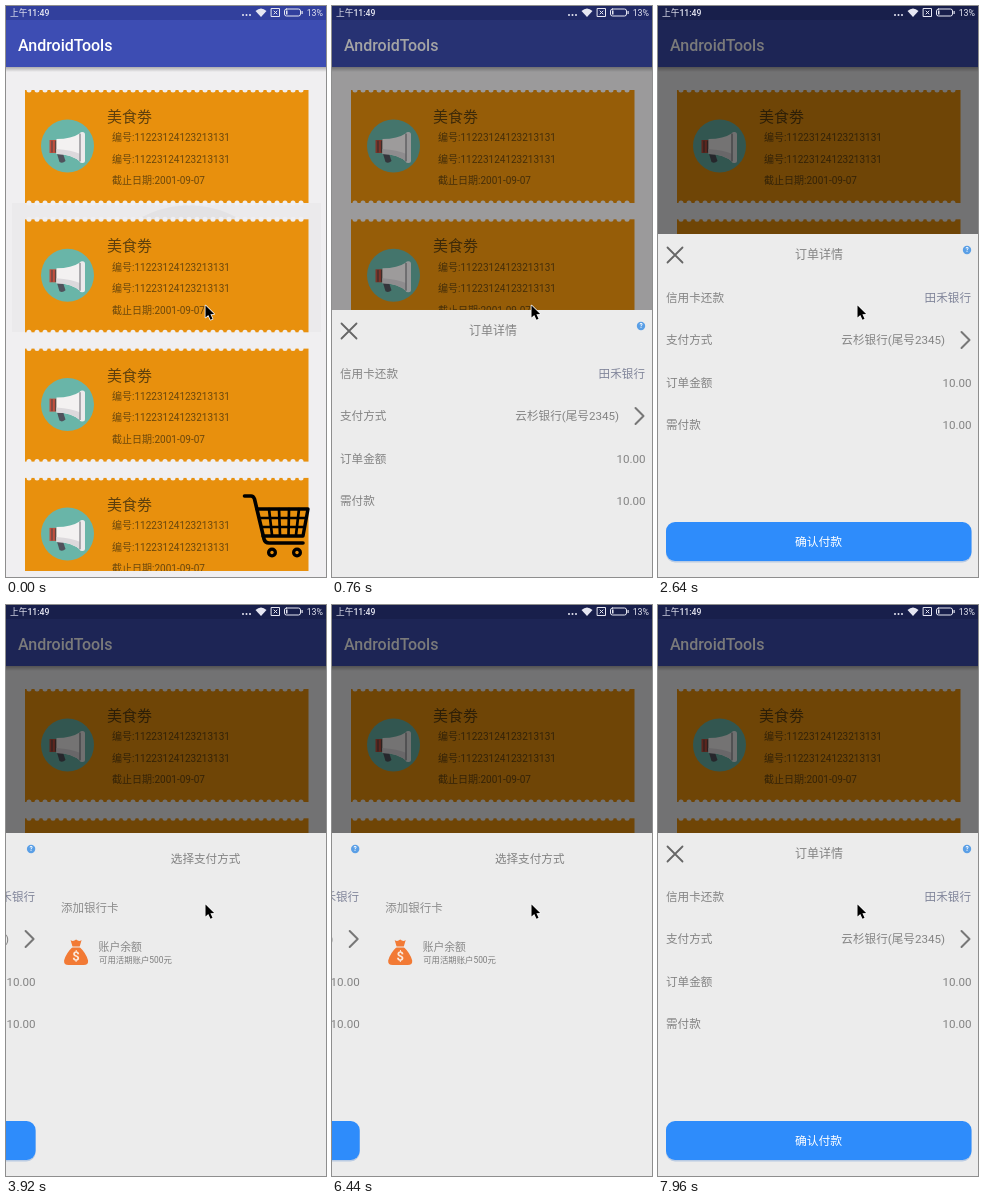
These frames come from a looping animation (320x571 px, 8000 ms). An HTML page with a canvas:

```html
<!DOCTYPE html>
<html lang="zh-CN">
<head>
<meta charset="utf-8">
<title>订单详情</title>
<style>
html, body { margin: 0; width: 100%; height: 100%; overflow: hidden; background: #f0eff1; }
canvas { display: block; width: 320px; height: 571px; }
</style>
</head>
<body>
<canvas id="stage"></canvas>
<script>
const W = 320, H = 571, LOOP = 8000, SHEET_TOP = 228;
const FONT = 'Roboto, "Noto Sans CJK SC", "Noto Sans CJK", sans-serif';
const PAPER = '#f0eff1', GREY = '#838383';
const canvas = document.getElementById('stage');
const g = canvas.getContext('2d');
const scale = window.devicePixelRatio || 1;
canvas.width = W * scale;
canvas.height = H * scale;

const progress = (t, start, length) => Math.min(1, Math.max(0, (t - start) / length));
const easeInOut = p => (1 - Math.cos(Math.PI * p)) / 2;

function rect(x, y, w, h, color) {
  g.fillStyle = color;
  g.fillRect(x, y, w, h);
}

function roundRect(x, y, w, h, r, color) {
  g.fillStyle = color;
  g.beginPath();
  g.roundRect(x, y, w, h, r);
  g.fill();
}

function circle(x, y, r, color) {
  g.fillStyle = color;
  g.beginPath();
  g.arc(x, y, r, 0, 2 * Math.PI);
  g.fill();
}

function fill(path, color) {
  g.fillStyle = color;
  g.fill(new Path2D(path));
}

function stroke(path, color, width) {
  g.strokeStyle = color;
  g.lineWidth = width;
  g.lineCap = g.lineJoin = 'round';
  g.stroke(new Path2D(path));
}

// cy is the vertical centre of the glyphs.
function text(str, x, cy, size, color, align = 'left', weight = 400) {
  g.font = `${weight} ${size}px ${FONT}`;
  g.textAlign = align;
  g.fillStyle = color;
  g.fillText(str, x, cy + size * 0.37);
}

function at(x, y, draw) {
  g.save();
  g.translate(x, y);
  draw();
  g.restore();
}

function megaphone() {
  circle(0, 0, 26.5, '#69b5a8');
  fill('M-11 6 H-5 L-2 15 Q-5 18 -8 16Z', '#50525c');
  fill('M-18 -6 H-11 V7 H-18Z', '#c2503f');
  stroke('M-15.5 -5 V6 M-12 -5 V6', '#5a4643', 1.2);
  fill('M-11 -7 Q4 -7 13 -13 V16 Q4 8 -11 8Z', '#f3f1f1');
  fill('M-11 3 Q4 4 13 8 V16 Q4 8 -11 8Z', '#dcd9dc');
  roundRect(12, -14, 5.5, 31, 2.5, '#eceaec');
  stroke('M12.5 -12 V15', '#6b6a70', 1);
}

function coupon() {
  rect(19, 0, 283.5, 113, '#e8900d');
  for (let x = 23; x < 302; x += 8) {
    circle(x, 0, 2.5, PAPER);
    circle(x, 113, 2.5, PAPER);
  }
  at(61.5, 56, megaphone);
  text('美食劵', 101, 26.5, 15, '#5d3f0d');
  text('编号:11223124123213131', 106, 47.5, 10, '#6a470d');
  text('编号:11223124123213131', 106, 69, 10, '#6a470d');
  text('截止日期:2001-09-07', 106, 90.5, 10, '#6a470d');
}

function cart() {
  stroke('M1.5 2 H8 Q10.5 2 11.5 5 L21 45 Q22 49 26 49 H60', '#000', 3.6);
  stroke('M14 15 H65 L60 42 H20', '#000', 3.4);
  stroke('M17 24 H63 M19 33 H61 M26 15 L29 41 M36 15 L37 41 M46 15 L45.5 41 M56 15 L53 41', '#000', 2.7);
  for (const x of [29, 54]) {
    circle(x, 58.5, 5, '#000');
    circle(x, 58.5, 1.7, '#e8900d');
  }
}

function ripple(t) {
  const fade = 1 - progress(t, 200, 250);
  if (!fade) return;
  g.save();
  g.beginPath();
  g.rect(6, 197, 309, 129);
  g.clip();
  rect(6, 197, 309, 129, `rgba(0,0,0,${0.018 * fade})`);
  circle(183, 300, 100 + 160 * progress(t, 0, 250), `rgba(0,0,0,${0.035 * fade})`);
  g.restore();
}

function couponList(t) {
  rect(0, 0, W, H, PAPER);
  ripple(t);
  g.save();
  g.beginPath();
  g.rect(0, 61, W, 504);
  g.clip();
  for (let i = 0; i < 4; i++) at(0, 84 + i * 129.3, coupon);
  g.restore();
  at(237, 488, cart);

  const shadow = g.createLinearGradient(0, 61, 0, 66);
  shadow.addColorStop(0, 'rgba(0,0,0,.28)');
  shadow.addColorStop(1, 'rgba(0,0,0,0)');
  rect(0, 61, W, 5, shadow);
  rect(0, 0, W, 61, '#3d4db3');
  rect(0, 0, W, 14, '#32409d');
  text('AndroidTools', 12, 38.7, 16, '#fff', 'left', 500);
}

function statusBar() {
  const white = '#e6e7f2';
  text('上午11:49', 4, 6.8, 8.7, white, 'left', 500);
  text('13%', 317, 6.8, 8.8, white, 'right');
  for (const x of [237, 240.5, 244]) circle(x, 9, 1, white);
  fill('M249.5 5 Q255 0 260.5 5 L255 11Z', white);
  g.strokeStyle = white;
  g.lineWidth = 1;
  g.strokeRect(265.5, 2.5, 8, 8);
  stroke('M268 5 L271 8 M271 5 L268 8', white, 1);
  g.beginPath();
  g.roundRect(278.5, 3, 16, 7, 2);
  g.stroke();
  rect(280, 4.5, 1.5, 4, white);
  rect(295.5, 5, 1.2, 3, white);
}

function orderPage() {
  stroke('M9.5 13.5 L24.5 28.5 M24.5 13.5 L9.5 28.5', '#666', 1.8);
  text('订单详情', 161, 21, 12, GREY, 'center');
  circle(309, 16, 4.2, '#5a9fe6');
  text('?', 309, 16, 6.5, '#fff', 'center', 700);
  const rows = [
    ['信用卡还款', '田禾银行', 64, 313, '#80859a'],
    ['支付方式', '云杉银行(尾号2345)', 105.5, 287, GREY],
    ['订单金额', '10.00', 149, 313.5, GREY],
    ['需付款', '10.00', 190.5, 313.5, GREY]
  ];
  for (const [label, value, y, right, color] of rows) {
    text(label, 8, y, 11.6, GREY);
    text(value, right, y, 11.6, color, 'right');
  }
  stroke('M303.5 98 L311.5 106 L303.5 114', '#777', 2);
  roundRect(8, 289.5, 305.5, 39, 9, '#b9cbe3');
  roundRect(8, 288, 305.5, 39, 9, '#2e8cfb');
  text('确认付款', 160.5, 308, 11.8, '#fff', 'center', 500);
}

function moneyBag() {
  fill('M7.5 1 Q10 3 13 0.5 Q16 3 18.5 1 L16.5 8 Q23 14 25 21.5 Q25.5 26 20.5 26 H5.5 Q0.5 26 1 21.5 Q3 14 9.5 8Z', '#f27a35');
  stroke('M9 8 H17', '#ececec', 1);
  text('$', 13, 17.5, 13, '#fbe9dc', 'center', 700);
}

function methodPage() {
  text('选择支付方式', 163.5, 26, 11.6, GREY, 'center');
  text('添加银行卡', 19, 75, 11.5, '#8c8c8c');
  at(21, 106, moneyBag);
  text('账户余额', 56.5, 114, 10.8, '#888');
  text('可用活期账户500元', 57, 126.5, 8.4, '#7d7d7d');
}

function cursor() {
  const arrow = 'M0 0 L0 12 L2.8 9.4 L5 14.2 L7 13.3 L4.9 8.7 L8.6 8.5Z';
  stroke(arrow, '#f5f5f5', 1.6);
  fill(arrow, '#000');
}

function draw(t) {
  g.setTransform(scale, 0, 0, scale, 0, 0);
  couponList(t);

  const opening = progress(t, 417, 500);
  rect(0, 0, W, H, `rgba(0,0,0,${0.52 * opening})`);
  statusBar();

  if (opening > 0) {
    const top = H - (H - SHEET_TOP) * easeInOut(opening);
    const slide = W * (easeInOut(progress(t, 3530, 500)) - easeInOut(progress(t, 6335, 500)));
    rect(0, top, W, H - SHEET_TOP, '#ececec');
    at(-slide, top, orderPage);
    at(W - slide, top, methodPage);
  }
  at(199.5, 299.5, cursor);
}

const begin = performance.now();
function frame() {
  draw((performance.now() - begin) % LOOP);
  requestAnimationFrame(frame);
}
frame();
</script>
</body>
</html>
```
